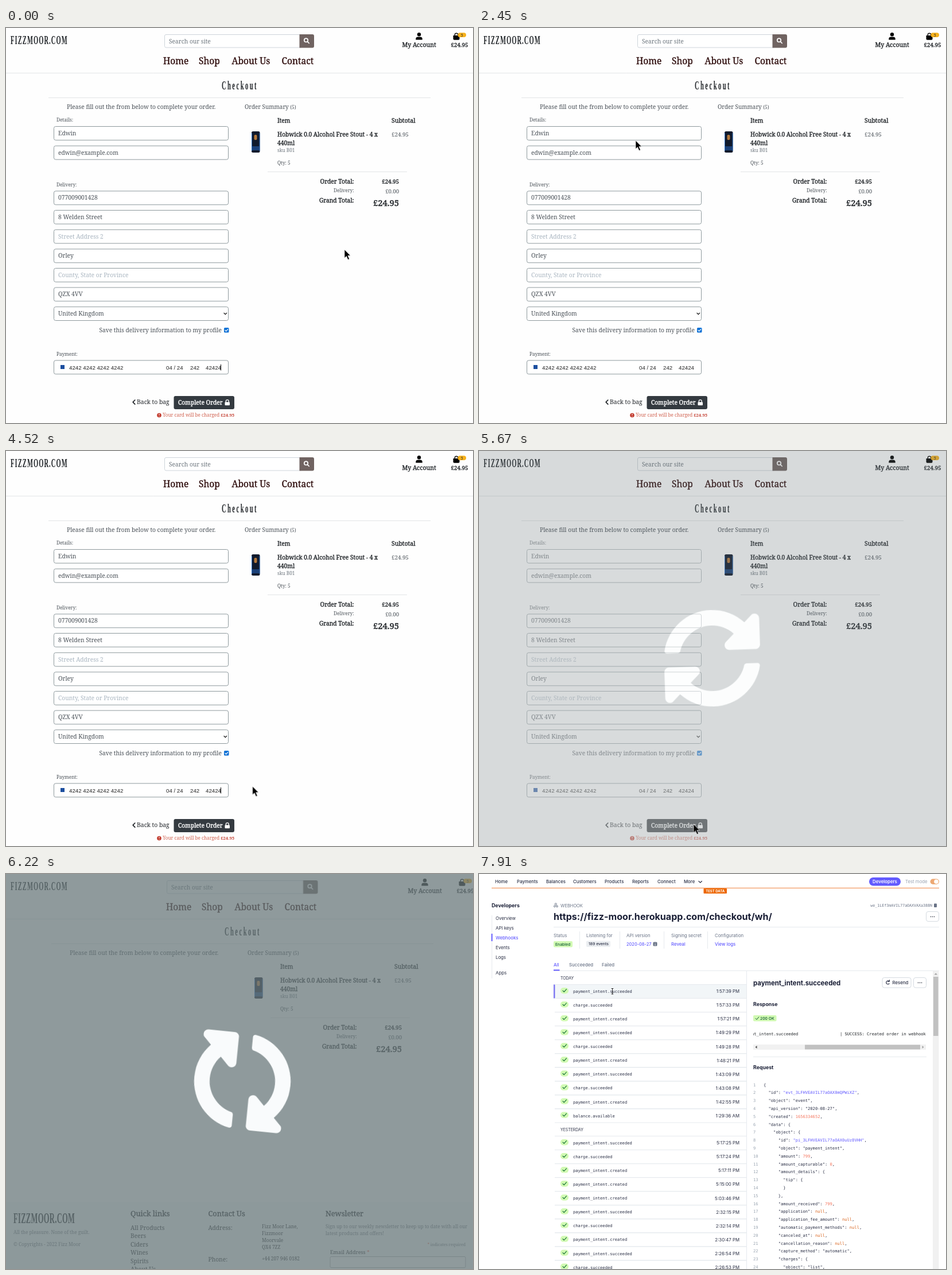
Animation of 814 by 688 pixels, one loop 8 s. Source, as an HTML page:

```html
<!DOCTYPE html>
<html lang="en">
<head>
<meta charset="utf-8">
<title>Checkout</title>
<style>
html, body { margin: 0; width: 100%; height: 100%; overflow: hidden; background: #fff; }
svg { display: block; width: 814px; height: 688px; font: 10.25px "Noto Serif", serif; fill: #212529; }
text { white-space: pre; }
.end { text-anchor: end; }
.mid { text-anchor: middle; }
/* A hairline stroke gives the weight between regular and bold */
.medium { stroke: #212529; stroke-width: .35px; }
.small { font-size: 8.2px; }
.muted { fill: #6c757d; }
.nav { font-size: 15.5px; fill: #2d0b0b; stroke: #2d0b0b; stroke-width: .35px; }
.head { font-size: 12.8px; }
.display { font: bold 21px "Liberation Serif", serif; }
.field { fill: #fff; stroke: #8e999d; }
.value { fill: #495057; }
.hint { fill: #a9b5c0; }
.card { font: 9.7px "Liberation Sans", sans-serif; fill: #222; }
.rule { stroke: #e3e5e7; fill: none; }
.line { fill: none; stroke-linecap: round; stroke-linejoin: round; }

.dash { font: 7.8px Inter, sans-serif; fill: #2a2f45; }
.dash .strong { font-weight: 700; font-size: 8.8px; fill: #1a1f36; }
.dash .mono { font: 7.12px "DejaVu Sans Mono", monospace; }
.dash .grey { fill: #697386; }
.dash .link { fill: #635bff; font-weight: 500; }
.dash .tag { font-size: 6.8px; font-weight: 500; }
.dash .rule { stroke: #e6eaee; }
.dash .box { fill: #fff; stroke: #d5dbe1; }
.num { fill: #f4745c; }
.null { fill: #d9651f; }
.id { fill: #635bff; }
.lineno { fill: #9aa5b1; }

.form { animation: fade-out 8s linear infinite; }
.overlay { animation: fade-in 8s linear infinite; }
.shift { animation: shift 8s step-end infinite; }
.after { animation: appear 8s step-end infinite; }
.dash { animation: cut 8s step-end infinite; }
.spin { animation: spin 8s linear infinite; }
.caret { animation: blink 8s step-end infinite; }
.button { fill: #343a40; animation: hover 8s step-end infinite; }
.pointer { animation: point 8s linear infinite; }
.beam { animation: beam 8s step-end infinite; }

@keyframes fade-out { 0%, 70% { opacity: 1 } 71.75% { opacity: .3 } 72.6%, 100% { opacity: 0 } }
@keyframes fade-in { 0%, 70% { opacity: 0 } 71.75% { opacity: .7 } 72.6%, 100% { opacity: 1 } }
@keyframes shift { 0% { transform: none } 72.6%, 100% { transform: translateX(var(--dx)) } }
@keyframes appear { 0% { opacity: 0 } 72.6%, 100% { opacity: 1 } }
@keyframes cut { 0% { opacity: 0 } 86.37%, 100% { opacity: 1 } }
@keyframes hover { 0% { fill: #343a40 } 60%, 100% { fill: #23272b } }
@keyframes beam { 0% { opacity: 0 } 98.5%, 100% { opacity: 1 } }
@keyframes blink {
  0%, 10.75%, 23.87%, 37.5%, 51.1%, 65% { opacity: 1 }
  4.12%, 17.4%, 30.5%, 44.25%, 58.37%, 70%, 100% { opacity: 0 }
}
@keyframes spin {
  0%, 70% { transform: rotate(-14.5deg) }
  71.75% { transform: rotate(10.3deg) }
  77.75% { transform: rotate(95.5deg) }
  85.5% { transform: rotate(194.5deg) }
  86.4%, 100% { transform: rotate(206deg) }
}
@keyframes point {
  0%, 4.1% { transform: translate(590px, 386px) }
  6% { transform: translate(622px, 300px) }
  7.75% { transform: translate(684px, 216px) }
  9.5% { transform: translate(722px, 258px) }
  11.5% { transform: translate(702px, 336px) }
  13.5% { transform: translate(640px, 352px) }
  15.4% { transform: translate(604px, 300px) }
  17.1% { transform: translate(650px, 254px) }
  18.75% { transform: translate(716px, 274px) }
  20.25% { transform: translate(730px, 326px) }
  22% { transform: translate(690px, 376px) }
  23.9%, 25.8% { transform: translate(602px, 350px) }
  27.5% { transform: translate(560px, 290px) }
  30.6%, 31.3% { transform: translate(273px, 196px) }
  32.2% { transform: translate(140px, 165px) }
  33.5% { transform: translate(24px, 214px) }
  35% { transform: translate(70px, 330px) }
  36.6% { transform: translate(190px, 370px) }
  38.25% { transform: translate(300px, 290px) }
  39.75% { transform: translate(250px, 190px) }
  41% { transform: translate(150px, 171px) }
  42.75% { transform: translate(28px, 260px) }
  44.6% { transform: translate(70px, 390px) }
  46.9% { transform: translate(172px, 410px) }
  48.75% { transform: translate(290px, 320px) }
  50.25% { transform: translate(330px, 266px) }
  52.5% { transform: translate(370px, 400px) }
  55% { transform: translate(418px, 550px) }
  56.5% { transform: translate(430px, 584px) }
  57.4% { transform: translate(406px, 597px) }
  58.4% { transform: translate(396px, 612px) }
  61.9%, 72.5% { transform: translate(374px, 650px) }
  72.51%, 92% { transform: translate(176px, -24px) }
  93.5% { transform: translate(159px, 40px) }
  95.5% { transform: translate(180px, 120px) }
  97.2% { transform: translate(214px, 176px) }
  98.49% { transform: translate(226px, 192px) }
  98.5%, 100% { transform: translate(-40px, -40px) }
}
</style>
</head>
<body>
<svg viewBox="0 0 814 688">
  <rect width="814" height="688" fill="#fefefe"/>

  <!-- Shop header -->
  <text class="display" transform="translate(8 28) scale(.5 1)" letter-spacing="2.2">FIZZMOOR.COM</text>
  <g class="shift" style="--dx:4px">
    <rect x="276.5" y="11.5" width="240" height="22.5" rx="2.5" fill="#fff" stroke="#ced4da"/>
    <text x="284" y="26.5" class="muted">Search our site</text>
  </g>
  <g class="shift" style="--dx:6.5px">
    <path d="M511.5 11h22.5a3 3 0 0 1 3 3v17.5a3 3 0 0 1-3 3h-22.5z" fill="#706361"/>
    <g class="line" stroke="#fff" stroke-width="1.7"><circle cx="523" cy="21.3" r="3.2"/><path d="M525.5 23.8l2.7 2.7"/></g>
  </g>
  <g class="nav shift" style="--dx:5px">
    <text x="274" y="62.5">Home</text><text x="336" y="62.5">Shop</text>
    <text x="393.5" y="62.5">About Us</text><text x="480.5" y="62.5">Contact</text>
  </g>
  <g class="shift" style="--dx:10px">
    <g fill="#000">
      <circle cx="720" cy="11.3" r="3.2"/>
      <path d="M714.3 20.5v-1.5a3.6 3.6 0 0 1 3.6-3.6h4.2a3.6 3.6 0 0 1 3.6 3.6v1.5z"/>
      <path d="M779.5 13h11v6a1.800 1.800 0 0 1-1.800 1.800h-7.4a1.800 1.800 0 0 1-1.800-1.800z"/>
      <path d="M782.3 15v-3.2a2.7 2.7 0 0 1 5.4 0V15" fill="none" stroke="#000" stroke-width="1.4"/>
    </g>
    <rect x="787.5" y="8.3" width="14.5" height="7.7" rx="3.8" fill="#f6b11c"/>
    <text x="794.7" y="14.7" class="mid" font-size="7">5</text>
    <g class="mid medium">
      <text x="720" y="33" font-size="10.5">My Account</text>
      <text x="790.5" y="33" font-size="9.8">£24.95</text>
    </g>
  </g>
  <path class="rule" d="M0 78.5H814"/>

  <!-- Checkout -->
  <g class="shift" style="--dx:5px">
    <text class="display mid" transform="translate(407.5 107) scale(.5 1)" letter-spacing="5">Checkout</text>
    <path class="rule" d="M74 121.5H740M456 250.5H699"/>
    <text x="106" y="141" class="value">Please fill out the from below to complete your order.</text>
    <text x="416" y="141" class="value" font-size="9.9">Order Summary <tspan class="small">(5)</tspan></text>
    <g>
      <rect x="428" y="180" width="14.5" height="37" rx="2.5" fill="#111a2c"/>
      <rect x="429" y="206" width="12.5" height="7" fill="#1a4078"/>
      <path d="M428.5 183v31M442 183v31" stroke="#2c6fc0"/>
      <rect x="432.5" y="186" width="5" height="9" rx="2" fill="#b5793c"/>
    </g>
    <g class="medium">
      <text x="473" y="165">Item</text><text x="672" y="165" font-size="10.5">Subtotal</text>
      <text x="473" y="189">Hobwick 0.0 Alcohol Free Stout - 4 x</text>
      <text x="473" y="203.5">440ml</text>
    </g>
    <text x="672" y="189" class="value" font-size="9.8">£24.95</text>
    <text x="473" y="216" class="small muted">sku B01</text>
    <text x="473" y="238" class="small value">Qty: 5</text>
    <g class="end">
      <g class="medium">
        <text x="606.5" y="271">Order Total:</text><text x="685" y="271" font-size="9.8">£24.95</text>
        <text x="606.5" y="304">Grand Total:</text>
        <text x="685" y="310" font-size="14.8" stroke-width=".5">£24.95</text>
      </g>
      <text x="606.5" y="286" class="small value">Delivery:</text><text x="685" y="288" class="value" font-size="9.6">£0.00</text>
    </g>
  </g>

  <g class="form">
    <g id="fields"></g>
    <g class="small value">
      <text x="88" y="163">Details:</text><text x="88" y="276">Delivery:</text><text x="88" y="571">Payment:</text>
    </g>
    <path class="line" d="M380 496.5l2.3 2.3 2.3-2.3" stroke="#222" stroke-width="1.3"/>
    <text x="376" y="529.5" class="end value">Save this delivery information to my profile</text>
    <rect x="380" y="522" width="8.5" height="8.5" rx="1.5" fill="#0f72d6"/>
    <path class="line" d="M382 526.5l1.7 1.7 3-3.6" stroke="#fff" stroke-width="1.2"/>
    <rect x="95" y="587" width="7" height="7" fill="#1d4f9f"/>
    <g class="card">
      <text x="110" y="594.5">4242 4242 4242 4242</text><text x="279" y="594.5">04 / 24</text>
      <text x="321" y="594.5">242</text><text x="348" y="594.5">42424</text>
    </g>
    <rect class="caret" x="374" y="586" width="1" height="10.5" fill="#000"/>
    <path class="line" d="M224.8 648l-3.6 3.7 3.6 3.7" stroke="#212529" stroke-width="1.7"/>
    <text x="228" y="655" font-size="10.4">Back to bag</text>
    <rect class="button" x="292.5" y="641" width="105.5" height="23" rx="3"/>
    <text x="300" y="656" fill="#fff" stroke="#fff" stroke-width=".4">Complete Order</text>
    <rect x="381.5" y="651.5" width="8.5" height="5.8" rx="1" fill="#fff"/>
    <path d="M383.3 652v-2a2.45 2.45 0 0 1 4.9 0v2" fill="none" stroke="#fff" stroke-width="1.3"/>
    <circle cx="267" cy="674.5" r="3.8" fill="#c23b2e"/>
    <path d="M267 672v2.6M267 676v1" stroke="#fff" stroke-width="1.1"/>
    <text x="398" y="677" class="end" font-size="8.1" fill="#d0614f">Your card will be charged <tspan font-weight="700" font-size="7.7" fill="#c23b2e">£24.95</tspan></text>
  </g>

  <!-- Footer -->
  <g class="after">
    <rect y="571" width="814" height="117" fill="#f8f9fa"/>
    <text class="display" transform="translate(13 608) scale(.5 1)" style="font-size:25px" letter-spacing=".7">FIZZMOOR.COM</text>
    <g class="small muted">
      <text x="13" y="627">All the pleasure. None of the guilt.</text>
      <text x="13" y="648">© Copyrights - 2022 Fizz Moor</text>
      <text x="557" y="617">Sign up to our weekly newsletter to keep up to date with all our</text>
      <text x="557" y="628.5">latest products and offers!</text>
      <text x="801" y="647.5" class="end" font-size="7"><tspan fill="#e85c41">*</tspan> indicates required</text>
    </g>
    <g class="head medium">
      <text x="217" y="596">Quick links</text><text x="352.5" y="596">Contact Us</text><text x="557" y="596">Newsletter</text>
    </g>
    <g id="links"></g>
    <text x="352.5" y="619.5">Address:</text><text x="352.5" y="675">Phone:</text>
    <g class="small">
      <text x="446" y="617">Fizz Moor Lane,</text><text x="446" y="629">Fizzmoor</text>
      <text x="446" y="641">Moorvale</text><text x="446" y="652.5">QX4 7ZZ</text>
      <text x="446" y="673">+44 207 946 0182</text>
    </g>
    <text x="565" y="661.5" font-size="9">Email Address <tspan fill="#e85c41">*</tspan></text>
    <rect x="565" y="666.5" width="236" height="19" rx="2" fill="#fff" stroke="#abb0b2"/>
  </g>

  <g class="overlay">
    <rect width="814" height="688" fill="#6a797b" fill-opacity=".75"/>
    <g class="shift" style="--dx:5.5px"><g transform="translate(406.5 361)"><g class="spin">
      <g id="sync" transform="scale(.339)" fill="#f9fbfc"></g>
    </g></g></g>
  </g>

  <!-- Webhook dashboard -->
  <g class="dash">
    <rect width="814" height="688" fill="#fff"/>
    <g id="menu" font-weight="500"></g>
    <path class="line" d="M383 12.5l2.7 2.7 2.7-2.7" stroke="#2a2f45" stroke-width="1.2"/>
    <rect x="680" y="6" width="55" height="14.5" rx="7.2" fill="#635bff"/>
    <text x="707.5" y="16" class="mid" font-weight="600" fill="#fff">Developers</text>
    <text x="743" y="16" fill="#9aa3b2">Test mode</text>
    <rect x="786.5" y="8.5" width="15.5" height="9.5" rx="4.7" fill="#eda873"/>
    <circle cx="797" cy="13.2" r="3.8" fill="#fff"/>
    <path d="M22 24.5H802" stroke="#f3a777" stroke-width="1.3"/>
    <rect x="391.5" y="25" width="40.5" height="9" rx="1" fill="#ed6704"/>
    <text x="411.7" y="32" class="mid" font-size="6" font-weight="700" fill="#fff">TEST DATA</text>

    <text x="22" y="58" class="strong">Developers</text>
    <path class="rule" d="M22.5 72V182"/>
    <rect x="21.5" y="104" width="2" height="13" fill="#635bff"/>
    <g id="side"></g>

    <g fill="none" stroke="#697386"><circle cx="133.8" cy="52.5" r="1.6"/><circle cx="131.8" cy="56.3" r="1.4"/><circle cx="136" cy="56.3" r="1.4"/></g>
    <text x="142" y="57.5" class="grey" font-size="7.5">WEBHOOK</text>
    <text x="790" y="57" class="mono grey end" style="font-size:6.64px">we_1LEf3mAVIL77aOAXVAXa388N</text>
    <rect x="793" y="51.5" width="5" height="6.5" rx="1" fill="#697386"/>
    <text x="130" y="80" class="strong" style="font-size:16.1px">https://fizz-moor.herokuapp.com/checkout/wh/</text>
    <rect x="779.5" y="65.5" width="22" height="17" rx="3.5" class="box"/>
    <path class="line" d="M787.5 74.3h0M790.5 74.3h0M793.5 74.3h0" stroke="#414552" stroke-width="1.7"/>
    <path class="rule" d="M130 92.5H802M175.5 100V130M245.5 100V130M322.5 100V130M398.5 100V130M130 168.5H802M466.5 168V688M478 318.5H780"/>
    <g id="facts" class="grey"></g>
    <rect x="130" y="117" width="33" height="10.5" rx="2" fill="#d1fab3"/><text x="133" y="124.7" class="tag" fill="#0f5a2e">Enabled</text>
    <rect x="187" y="116.5" width="42" height="10.5" rx="2" fill="#ebeef1"/><text x="191" y="124.3" class="tag">189 events</text>
    <text x="257" y="125" class="link" font-size="7.4">2020-08-27</text>
    <rect x="303.5" y="118.5" width="7" height="7" rx="1.5" fill="#697386"/><path d="M307 120v1M307 122v2.5" stroke="#fff"/>
    <text x="335" y="125" class="link">Reveal</text><text x="411" y="125" class="link">View logs</text>
    <text x="130" y="161" class="link">All</text>
    <g class="grey" font-weight="500"><text x="157" y="161">Succeeded</text><text x="214" y="161">Failed</text></g>
    <rect x="130" y="166.5" width="10.5" height="2" fill="#635bff"/>

    <rect x="130" y="192.5" width="336" height="24" fill="#f2f6f8"/>
    <rect x="130" y="192.5" width="2.5" height="24" fill="#7f78f2"/>
    <g font-size="6.9"><text x="142" y="183.5">TODAY</text><text x="142" y="447.5">YESTERDAY</text></g>
    <g id="events"></g>

    <text x="478" y="193.5" class="strong" style="font-size:11.4px">payment_intent.succeeded</text>
    <rect x="703" y="180.5" width="50" height="17.5" rx="3.5" class="box"/>
    <path class="line" d="M715 187a3 3 0 1 0 0 4M712.8 187.2h2.5v-2.5" stroke="#2a2f45" stroke-width="1.2"/>
    <text x="720.5" y="192" font-weight="500">Resend</text>
    <rect x="757.5" y="180.5" width="22" height="17.5" rx="3.5" class="box"/>
    <path class="line" d="M765.5 189.3h0M768.5 189.3h0M771.5 189.3h0" stroke="#414552" stroke-width="1.7"/>
    <text x="478" y="230" class="strong">Response</text>
    <rect x="478" y="246" width="40.5" height="10.5" rx="2" fill="#d1fab3"/>
    <path class="line" d="M482 251.5l2 2 3.8-4.5" stroke="#0f5a2e"/>
    <text x="490" y="254" class="tag" fill="#0f5a2e">200 OK</text>
    <svg x="478" y="270" style="width:302px;height:18px" class="mono">
      <text x="-3" y="11">nt_intent.succeeded</text><text x="151" y="11">| SUCCESS: Created order in webhook</text>
    </svg>
    <g fill="#f1f1f1"><rect x="478" y="297" width="301" height="9"/><rect x="791" y="168.5" width="10.5" height="520"/></g>
    <g fill="#c1c1c1"><rect x="568" y="297.5" width="201" height="8"/><rect x="792" y="179" width="8.5" height="103"/></g>
    <path d="M484.5 299v5l-3-2.5z" fill="#505050"/><path d="M772.5 299v5l3-2.5zM793.5 175.5h5.5l-2.75-3z" fill="#a3a3a3"/>
    <text x="478" y="339.5" class="strong">Request</text>
    <g id="code" class="mono"></g>
    <path class="beam line" d="M231 199.5h3M232.5 199.5v9.5M231 209h3" stroke="#000" stroke-width=".8"/>
  </g>

  <path class="pointer" d="M0 0V14.6L3.4 11.5 6 17.5 8.5 16.4 5.9 10.6H10.4Z" fill="#000" stroke="#fff" stroke-width=".6"/>
</svg>
<script>
const put = (id, parts) => { document.getElementById(id).innerHTML = parts.join(''); };
const text = (x, y, s, cls = '') => `<text x="${x}" y="${y}" class="${cls}">${s}</text>`;

// Form fields: [top, content, is placeholder]
put('fields', [
  [171.5, 'Edwin'], [205.3, 'edwin@example.com'],
  [284, '077009001428'], [317.5, '8 Welden Street'], [351.3, 'Street Address 2', 1],
  [385, 'Orley'], [418.5, 'County, State or Province', 1], [452, 'QZX 4VV'],
  [485.7, 'United Kingdom'], [579, '']
].map(([y, s, hint]) =>
  `<rect class="field" x="83.5" y="${y}" width="304" height="23.8" rx="3"/>` +
  text(91, y + 15.4, s, hint ? 'hint' : 'value')));

put('links', ['All Products', 'Beers', 'Ciders', 'Wines', 'Spirits', 'About Us']
  .map((s, i) => text(217, 619.5 + i * 14.5, s)));

// Two arrows, the second turned half round
const arrow = 'M114.7-122.7C83.5-152 42.9-168 0-168c-77.5 0-144.3 53.2-162.9 126.85-1.3 5.4-6.1 9.15-11.7 9.15h-57.3c-7.5 0-13.2-6.8-11.8-14.2C-222.1-161.1-121.2-248 0-248c66.4 0 126.8 26.1 171.3 68.7L207-215c15.1-15.1 41-4.4 41 17V-64c0 13.25-10.75 24-24 24H89.9C68.6-40 57.9-65.9 73-81z';
put('sync', [0, 180].map(a => `<path d="${arrow}" transform="rotate(${a})"/>`));

const row = (y, items) => items.map(([x, s]) => text(x, y, s));
put('menu', row(16, [[28, 'Home'], [66, 'Payments'], [117, 'Balances'], [164, 'Customers'],
  [219, 'Products'], [267, 'Reports'], [311, 'Connect'], [357, 'More']]));
put('facts', row(110, [[130, 'Status'], [187, 'Listening for'], [257, 'API version'],
  [335, 'Signing secret'], [411, 'Configuration']]));
put('side', ['Overview', 'API keys', 'Webhooks', 'Events', 'Logs', '', 'Apps'].map((s, i) =>
  text(29, 80 + i * 17 - (i > 5 ? 7 : 0), s, s === 'Webhooks' ? 'link' : '')));

// Event log: initial letter of the kind, then the time
const kinds = { s: 'payment_intent.succeeded', h: 'charge.succeeded', c: 'payment_intent.created', b: 'balance.available' };
const eventRows = (top, list) => list.split(',').map((item, i) => {
  const y = top + i * 24.05;
  return `<path class="rule" d="M132 ${y}H466M132 ${y + 24.05}H466"/>` +
    `<rect x="142" y="${y + 5.5}" width="14" height="10.5" rx="5" fill="#d1fab3"/>` +
    `<path class="line" d="M146 ${y + 10.7}l2.2 2.2 4.3-4.7" stroke="#0b6b2e" stroke-width="1.1"/>` +
    text(164, y + 14.6, kinds[item[0]], 'mono') + text(454, y + 14.8, item.slice(1), 'end');
});
put('events', [
  ...eventRows(192.5, 's1:57:39 PM,h1:57:33 PM,c1:57:21 PM,s1:49:29 PM,h1:49:28 PM,c1:48:21 PM,s1:43:09 PM,h1:43:08 PM,c1:42:55 PM,b1:29:36 AM'),
  ...eventRows(456.5, 's5:17:25 PM,h5:17:24 PM,c5:17:11 PM,c5:15:00 PM,c5:03:46 PM,s2:32:15 PM,h2:32:14 PM,c2:30:47 PM,s2:26:54 PM,h2:26:53 PM')
]);

const json = `{
  "id": "evt_3LFHVEAVIL77aOAX0mQPWiXZ",
  "object": "event",
  "api_version": "2020-08-27",
  "created": 1656334652,
  "data": {
    "object": {
      "id": "pi_3LFHVEAVIL77aOAX0uUz8VHH",
      "object": "payment_intent",
      "amount": 799,
      "amount_capturable": 0,
      "amount_details": {
        "tip": {
        }
      },
      "amount_received": 799,
      "application": null,
      "application_fee_amount": null,
      "automatic_payment_methods": null,
      "canceled_at": null,
      "cancellation_reason": null,
      "capture_method": "automatic",
      "charges": {
        "object": "list",`;
const paint = s => s
  .replace(/: (\d+)/, ': <tspan class="num">$1</tspan>')
  .replace(/: (null)/, ': <tspan class="null">$1</tspan>')
  .replace(/("(evt|pi)_\w+")/, '<tspan class="id">$1</tspan>');
put('code', json.split('\n').map((s, i) => {
  const y = 369.5 + i * 13.8;
  return text(478, y, i + 1, 'lineno') + text(496, y, paint(s));
}));
</script>
</body>
</html>
```
